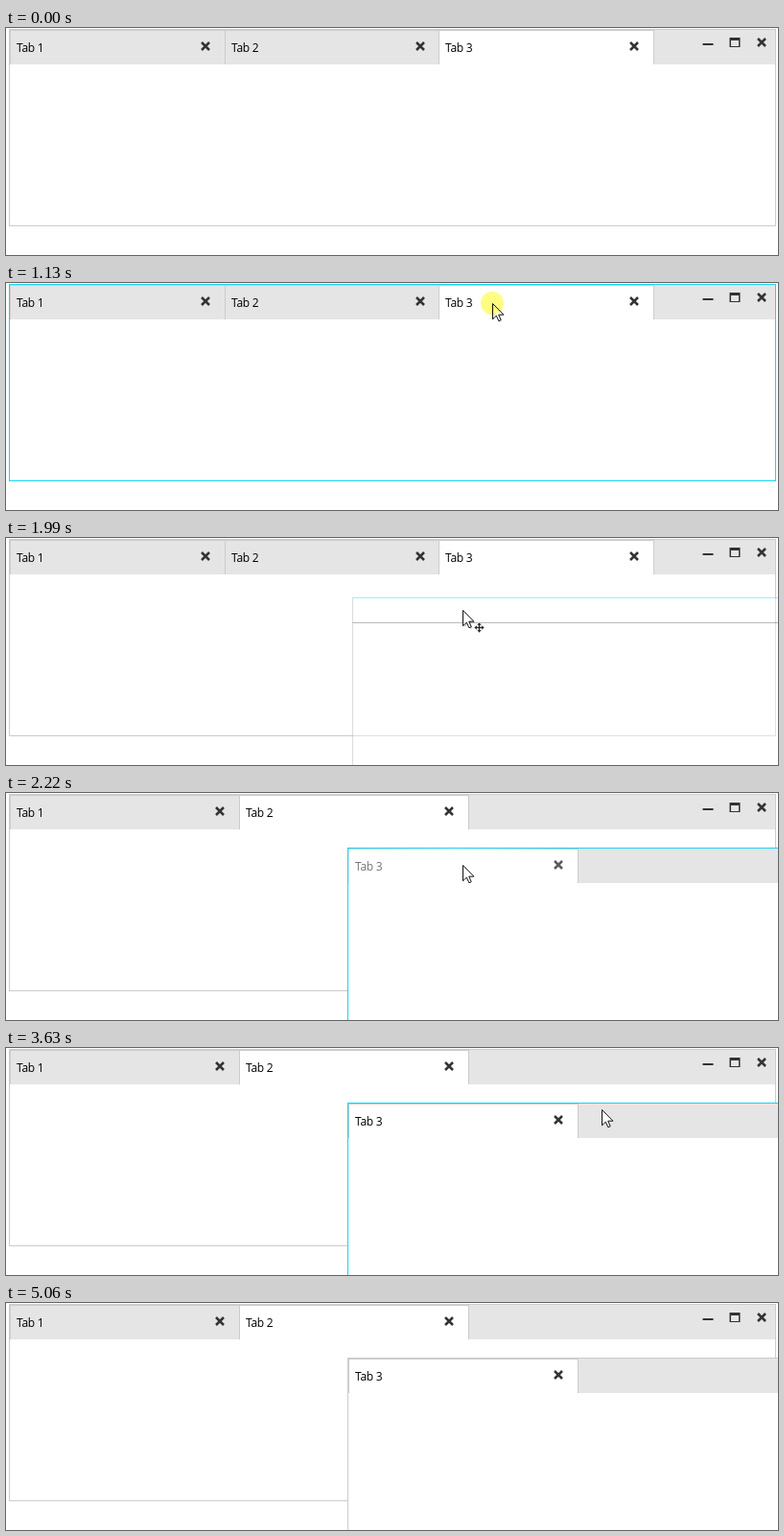
An HTML page that plays this animation: 805 by 237 pixels, repeating every 5200 ms.

```html
<!DOCTYPE html>
<html lang="en">
<head>
<meta charset="utf-8">
<title>Tearing off a tab</title>
<style>
html, body { margin: 0; width: 100%; height: 100%; overflow: hidden; background: #fff; }
svg { display: block; }
rect { shape-rendering: crispEdges; }
text { font: 12px "Open Sans", "Noto Sans", sans-serif; letter-spacing: -.25px; }
.spot { mix-blend-mode: multiply; }
</style>
</head>
<body>
<svg id="stage" width="805" height="237" viewBox="0 0 805 237"></svg>
<script>
const LOOP = 5200, STEP = 77;
const GRAY = '#cccccc', HEADER = '#e5e5e5', INK = '#333333', CYAN = '#19d3f7';
const PRESS = 1060, RELEASE = 1770, OPEN = 1990, LEAVE = 4820, BLUR = 5060;
const stage = document.getElementById('stage');

const box = (x, y, w, h, fill, extra = '') =>
  `<rect x="${x}" y="${y}" width="${w}" height="${h}" fill="${fill}" ${extra}/>`;
const group = (x, y, opacity, body) =>
  `<g transform="translate(${x} ${y})" opacity="${opacity}">${body}</g>`;
const ramp = (t, start, end) => Math.min(1, Math.max(0, (t - start) / (end - start)));
const smooth = u => u * u * (3 - 2 * u);

// Eased curve from a to b, bent towards c
const glide = (a, c, b) => u => {
  const e = smooth(u), d = 1 - e;
  return a.map((v, i) => Math.round(d * d * v + 2 * d * e * c[i] + e * e * b[i]));
};

// One counterclockwise turn
const lap = (cx, cy, rx, ry) => u => {
  const a = 1.12 + 2 * Math.PI * u;
  return [Math.round(cx + rx * Math.cos(a)), Math.round(cy - ry * Math.sin(a))];
};

const moves = [
  { start: 140, end: 750, path: glide([695, 203], [617, -30], [508, 18]) },
  { start: PRESS, end: 1540, path: glide([508, 18], [503, 42], [476, 75]) },
  { start: 2610, end: 3080, path: glide([476, 75], [720, 66], [621, 63]) },
  { start: 3170, end: 3630, path: lap(614, 74, 16, 11) },
  { start: 3730, end: 4190, path: lap(614.5, 73.5, 14.5, 9.5) },
  { start: 4270, end: 4730, path: glide([621, 65], [539, 80], [762, 236]) }
];

// The pointer is sampled at even steps and rests between moves
function pointerAt(t) {
  const move = moves.filter(m => m.start <= t).pop();
  if (!move || t >= LEAVE) return null;
  const last = Math.round((move.end - move.start) / STEP);
  const i = Math.floor(ramp(t, move.start, move.end) * last + 1e-6);
  return move.path((i + 1) / (last + 1));
}

const cross = (x, y, opacity = 1) =>
  `<path d="M${x - 4} ${y - 4}l8 8m0 -8l-8 8" stroke="${INK}" stroke-width="2.5" opacity="${opacity}"/>`;

function tab(x, y, w, name, active, hover = 0) {
  const shine = hover
    ? box(x + 1, y, w - 1, 1, 'url(#shine)', `opacity="${hover}"`) +
      box(x, y + 1, 1, 35, '#fff', `opacity="${0.6 * hover}"`)
    : '';
  return box(x, y, w + 1, 36, GRAY) +
    box(x + 1, y + 1, w - 1, 35, active ? '#fff' : HEADER) + shine +
    `<text x="${x + 7}" y="${y + 23}" fill="#000" opacity="${1 - 0.45 * hover}">${name}</text>` +
    cross(x + w - 20, y + 17, 1 - 0.2 * hover);
}

// Window chrome; glow is the strength of the active border
const frame = (x, y, w, h, glow) =>
  box(x, y, w, h, GRAY) + box(x, y, w, h, CYAN, `opacity="${glow}"`) +
  box(x + 1, y + 1, w - 2, h - 2, '#fff') + box(x + 1, y + 1, w - 2, 36, HEADER);

const buttons = `<path d="M726.5 17h11" stroke="${INK}" stroke-width="2"/>` +
  `<path d="M754.5 10h11v10h-11zM756 13v6h8v-6z" fill="${INK}" fill-rule="evenodd"/>` +
  cross(788, 15);

function mainWindow(t) {
  const glow = ramp(t, PRESS - 1, PRESS) - ramp(t, RELEASE - STEP, RELEASE + STEP);
  const hover = ramp(t, 440, 600) - ramp(t, PRESS - STEP, PRESS + STEP);
  const count = t < OPEN + 2 * STEP ? 3 : 2;
  const width = Math.min(239, 671 / count);
  const tabs = Array.from({ length: count }, (_, i) => {
    const x = Math.round(4 + i * width);
    const active = i === count - 1;
    return tab(x, 2, Math.round(width), `Tab ${i + 1}`, active, count === 3 && active ? hover : 0);
  });
  return frame(3, 1, 800, 206, glow) + tabs.join('') + buttons;
}

// Fades in as a bare frame while sliding into place, then shows its tab
function newWindow(t) {
  if (t < OPEN) return '';
  const k = Math.min(3, Math.floor((t - OPEN) / STEP + 0.05));
  const shift = Math.round(5 * (1 - k / 3));
  const body = k < 2
    ? box(0, 0, 800, 206, '#fff') + box(0, 0, 1, 206, '#aaa') +
      box(0, 0, 800, 1, CYAN) + box(0, 26, 800, 1, '#555')
    : frame(0, 0, 800, 206, t < BLUR ? 1 : 0) +
      tab(1, 1, 239, 'Tab 3', true, 1 - ramp(t, 2760, 2920));
  return group(356 + shift, 57 + shift, 0.4 + 0.2 * k, body);
}

const ghost = ([x, y]) => group(x - 112, y - 18, 0.65, tab(0, 0, 224, 'Tab 3', true));

const ARROW = 'M.5 .5V16.8L4.3 13.2L6.9 18.8L9.2 17.7L6.7 12.2H11.9Z';
const moveIcon = `<path d="M17.5 13l2.6 3h-1.7v1.6h1.6v-1.7l3 2.6l-3 2.6v-1.7h-1.6v1.6h1.7l-2.6 3l-2.6-3h1.7v-1.6h-1.6v1.7l-3-2.6l3-2.6v1.7h1.6v-1.6h-1.7z" fill="#222" stroke="#fff" stroke-width=".5"/>`;

function pointer([x, y], dragging) {
  const shadow = dragging
    ? `<path d="${ARROW}" transform="translate(1.5 1.5)" opacity=".18"/>` : '';
  return group(x, y, 1, shadow + `<path d="${ARROW}" fill="#fff" stroke="#111"/>` +
    (dragging ? moveIcon : ''));
}

const defs = `<defs><linearGradient id="shine">
  <stop offset="0" stop-color="#fff" stop-opacity=".2"/>
  <stop offset=".45" stop-color="#fff" stop-opacity=".9"/>
  <stop offset="1" stop-color="#fff" stop-opacity="0"/></linearGradient></defs>`;

function scene(t) {
  const at = pointerAt(t);
  const pressed = t >= PRESS && t < RELEASE;
  const dragging = t >= PRESS + STEP && t < OPEN + 2 * STEP;
  let out = defs + mainWindow(t) + newWindow(t);
  if (pressed && dragging) out += ghost(at);
  if (at) out += pointer(at, dragging);
  if (pressed) out += `<circle class="spot" cx="${at[0]}" cy="${at[1]}" r="12" fill="#fffd80"/>`;
  return out;
}

let shown = '';
const begin = performance.now();
function draw() {
  const next = scene((performance.now() - begin) % LOOP);
  if (next !== shown) stage.innerHTML = shown = next;
  requestAnimationFrame(draw);
}
draw();
</script>
</body>
</html>
```
